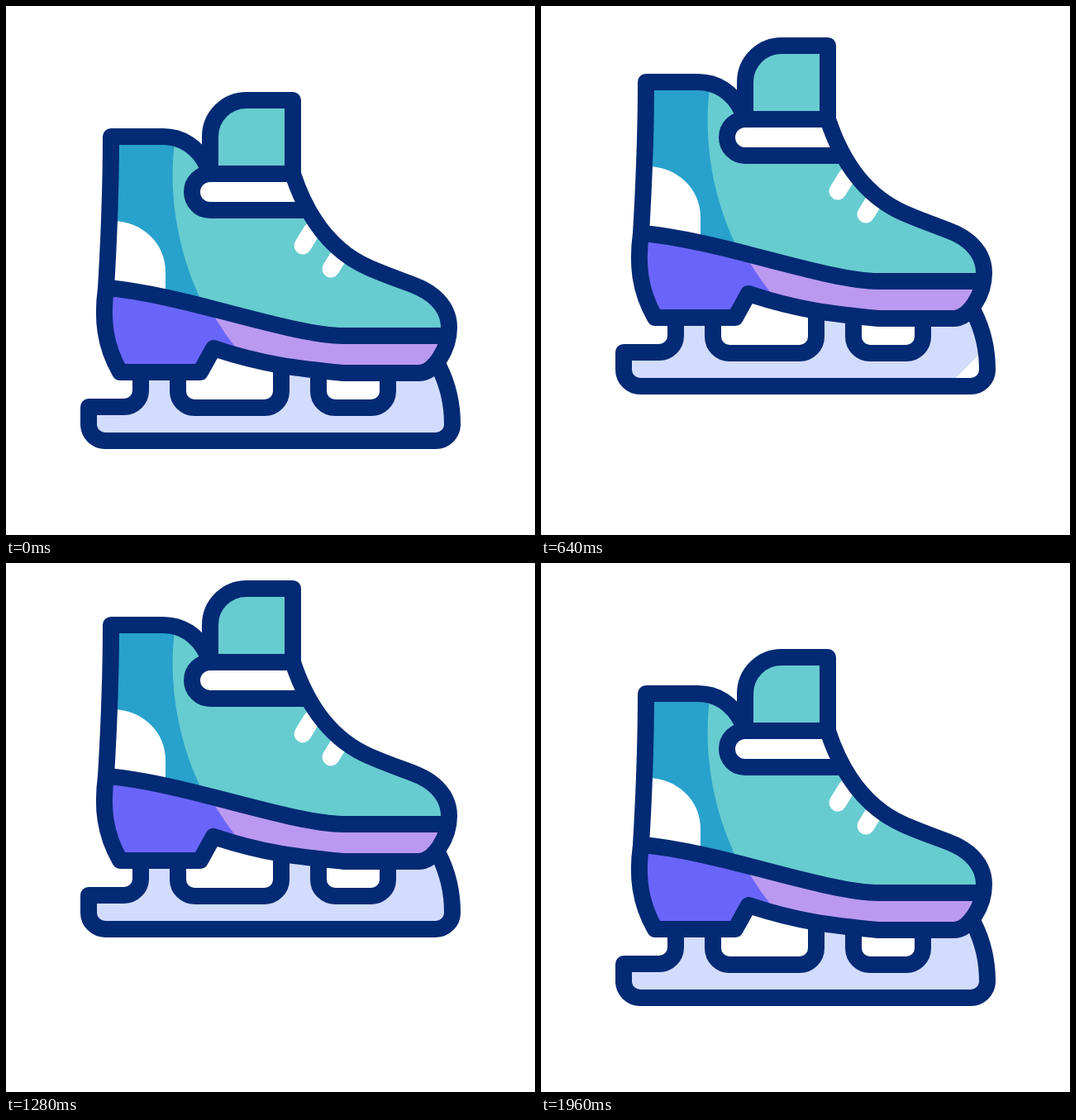
Write an HTML page that moves like this. It is 640x640 px and loops after 2200 ms.

```html
<!DOCTYPE html>
<html lang="en">
<head>
<meta charset="utf-8">
<title>Ice skate jump</title>
<style>
  html, body { margin: 0; width: 100%; height: 100%; overflow: hidden; background: #fff; }
  svg { display: block; width: 100vw; height: 100vh; }
  .line { fill: none; stroke: #032a74; stroke-width: 20; stroke-linecap: round; stroke-linejoin: round; }
  .lace { fill: none; stroke: #fff; stroke-width: 21; stroke-linecap: round; }
  #boot path { vector-effect: non-scaling-stroke; }
  #sparks { stroke: #ffcb52; stroke-linecap: round; }
</style>
</head>
<body>
<svg viewBox="0 0 640 640">
  <defs>
    <path id="blade" d="M163 444V465A20 20 0 0 1 143 485H100V506A20 20 0 0 0 120 526H520A20 20 0 0 0 540 506C540 480 534 457 524 437Z"/>
    <clipPath id="bladeClip"><use href="#blade"/></clipPath>
  </defs>

  <g id="skate">
    <use href="#blade" fill="#d2dcfe"/>
    <g clip-path="url(#bladeClip)">
      <path id="shine" fill="#fff" d="M0 516l80-80h28l-80 80zM102 516l80-80h28l-80 80z"/>
    </g>
    <path fill="#fff" d="M208 430V466A20 20 0 0 0 228 486H313A20 20 0 0 0 333 466V430ZM378 440V466A20 20 0 0 0 398 486H442A20 20 0 0 0 462 466V440Z"/>
    <path class="line" d="M163 444V465A20 20 0 0 1 143 485H100V506A20 20 0 0 0 120 526H520A20 20 0 0 0 540 506C540 480 534 457 524 437M208 444V466A20 20 0 0 0 228 486H313A20 20 0 0 0 333 466V438M378 444V466A20 20 0 0 0 398 486H442A20 20 0 0 0 462 466V444"/>

    <g id="boot">
      <!-- upper -->
      <path fill="#67ccd0" d="M127 158H190C212 158 232 170 243 193L247 203V158A44 44 0 0 1 291 114H347V203C365 258 396 296 440 317S500 337 517 351Q536 367 536 389V399H408C345 399 215 349 121 341Z"/>
      <path fill="#28a1cc" d="M127 158H205C195 225 207 300 240 364L121 341Z"/>
      <path fill="#fff" d="M128 260C165 260 193 287 193 322V352L122 341Z"/>
      <path fill="#fff" d="M347 203H247A22 22 0 0 0 247 247H364Q353 225 347 203Z"/>
      <path class="lace" d="M359 290L370 272M393 318L401 305"/>
      <!-- sole -->
      <path fill="#bb99f1" d="M240 364C300 379 365 399 408 399H535C532 425 517 444 500 444H408C355 439 310 434 252 414Z"/>
      <path fill="#6a65fa" d="M121 341C170 345 215 357 247 367Q261 392 280 416L252 414L235 443H138C119 410 116 378 121 341Z"/>
      <!-- outlines -->
      <path class="line" d="M243 193C232 170 212 158 190 158H127C127 230 124 290 121 341C116 378 119 410 138 443H235L251 414C310 434 355 439 408 444H500C517 444 536 416 536 389Q536 367 517 351C500 337 484 336 440 317S365 258 347 203V114H291A44 44 0 0 0 247 158V203"/>
      <path class="line" d="M347 203H247A22 22 0 0 0 247 247H360M122 341C215 349 345 399 408 399H533"/>
    </g>
  </g>
  <g id="sparks"></g>
</svg>

<script>
const LOOP = 2200, LIFT = 84, SQUASH = 0.942;
const get = id => document.getElementById(id);
const skate = get('skate'), boot = get('boot'), shine = get('shine');

const ramp = (t, a, b) => Math.min(1, Math.max(0, (t - a) / (b - a)));
const inOut = u => u < 0.5 ? 2 * u * u : 1 - 2 * (1 - u) ** 2;
const ease = (t, a, b) => inOut(ramp(t, a, b));

// inner end, direction, reach, start time, growth exponent
const right = [80, 1520, 0.5], left = [51, 1560, 0.8];
const sparks = [
  [569, 443, -45, ...right], [571, 497, 0, ...right], [572, 547, 45, ...right],
  [77, 443, 221, ...left], [78, 492, 180, ...left], [80, 547, 140, ...left]
].map(([x, y, angle, reach, start, power]) => {
  const line = document.createElementNS('http://www.w3.org/2000/svg', 'line');
  line.setAttribute('transform', `translate(${x} ${y}) rotate(${angle})`);
  get('sparks').append(line);
  return { line, reach, start, power };
});

function drawSpark({ line, reach, start, power }, t) {
  const end = 1930, u = ramp(t, start, end);
  line.style.display = u > 0 && u < 1 ? '' : 'none';
  line.setAttribute('x1', reach * ramp(t, 1600, end) ** 2);
  line.setAttribute('x2', reach * u ** power);
  line.setAttribute('stroke-width', 20 * Math.min(1, (1 - u) * 5));
}

function draw(t) {
  const lift = LIFT * (ease(t, 400, 758) - ramp(t, 1240, 1600) ** 2.1);
  const press = ease(t, 120, 400) - ease(t, 400, 600)
              + ease(t, 1280, 1600) - ease(t, 1600, 1920);
  const scale = 1 - (1 - SQUASH) * press;
  const shineX = t < 1000 ? 183 + (t - 480) * 1.98 : 489 - (t - 1440) * 1.45;

  skate.setAttribute('transform', `translate(0 ${-lift})`);
  boot.setAttribute('transform', `translate(0 ${444 * (1 - scale)}) scale(1 ${scale})`);
  shine.setAttribute('transform', `translate(${shineX} 0)`);
  sparks.forEach(s => drawSpark(s, t));
}

const begin = performance.now();
function tick() {
  draw((performance.now() - begin) % LOOP);
  requestAnimationFrame(tick);
}
tick();
</script>
</body>
</html>
```
